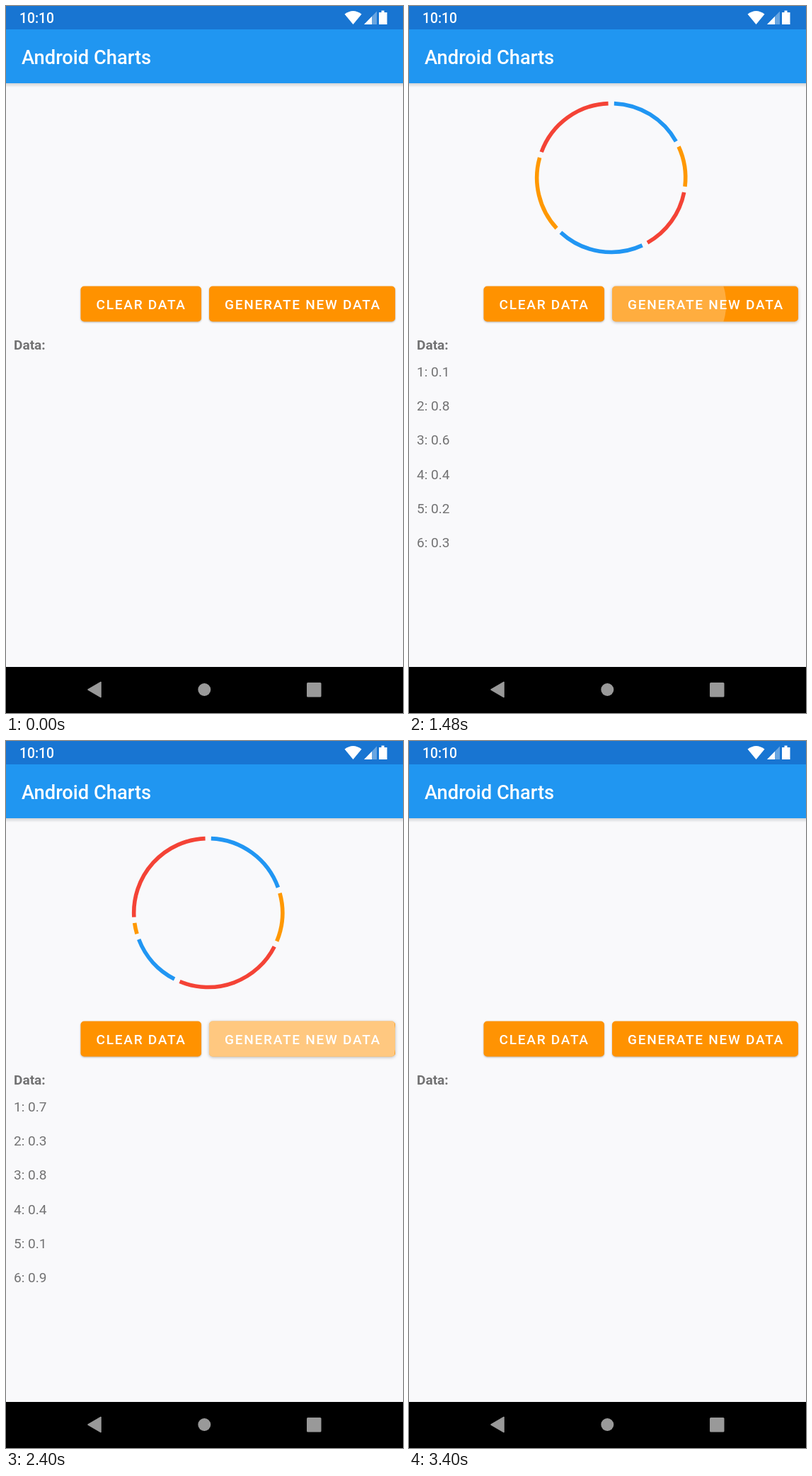
These frames come from a looping animation (561x998 px, 3.88 s). An HTML page:

```html
<!DOCTYPE html>
<html lang="en">
<head>
<meta charset="utf-8">
<title>Android Charts</title>
<style>
html, body { margin: 0; width: 100%; height: 100%; overflow: hidden; background: #f9f9fb; }
svg { display: block; width: 561px; height: 998px; font-family: Roboto, "Noto Sans", sans-serif; }
.medium { font-weight: 500; fill: #fff; }
.label { font-size: 19.1px; font-weight: 500; fill: #fff; letter-spacing: 1.71px; }
.data { font-size: 19.1px; fill: #727273; }
.face { fill: #ff9200; }
</style>
</head>
<body>
<svg viewBox="0 0 561 998">
  <defs>
    <linearGradient id="fade" x2="0" y2="1">
      <stop stop-opacity=".15"/>
      <stop offset="1" stop-opacity="0"/>
    </linearGradient>
    <clipPath id="clipClear"><rect x="105.5" y="395.5" width="170.5" height="50" rx="5"/></clipPath>
    <clipPath id="clipNew"><rect x="287" y="395.5" width="263" height="50" rx="5"/></clipPath>
  </defs>
  <rect width="561" height="998" fill="#f9f9fb"/>

  <rect y="109" width="561" height="6" fill="url(#fade)"/>
  <rect y="32" width="561" height="77" fill="#2096f1"/>
  <rect width="561" height="33" fill="#1875d2"/>
  <text class="medium" x="19" y="24" font-size="19.3">10:10</text>
  <g fill="#fff">
    <path d="M478.5 11.5Q490.500 2.500 502.500 11.500L490.500 26Z"/>
    <path d="M506 26L524 7.500V26Z" opacity=".35"/>
    <path d="M506 26L517 14.700V26Z"/>
    <path d="M527 9h3.500V6.500h4V9H538.500V26H527Z"/>
  </g>
  <text class="medium" x="22" y="81.500" font-size="27.3">Android Charts</text>

  <g id="ring" fill="none" stroke-width="5.6"></g>

  <g id="clear">
    <rect class="face" x="105.5" y="395.5" width="170.5" height="50" rx="5"/>
    <circle clip-path="url(#clipClear)" fill="#fff"/>
    <text class="label" x="127.500" y="428">CLEAR DATA</text>
  </g>
  <g id="new">
    <rect class="face" x="287" y="395.5" width="263" height="50" rx="5"/>
    <circle clip-path="url(#clipNew)" fill="#fff"/>
    <text class="label" x="309" y="428">GENERATE NEW DATA</text>
  </g>

  <text class="data" x="11" y="485.300" font-weight="700">Data:</text>
  <g id="rows"></g>

  <rect y="933" width="561" height="65"/>
  <g fill="#999">
    <path d="M116 965L134 954.500V975.500Z" stroke="#999" stroke-width="1.5" stroke-linejoin="round"/>
    <circle cx="280.300" cy="965" r="9"/>
    <rect x="425" y="955" width="20.500" height="20.500" rx="1.500"/>
  </g>
</svg>
<script>
const LOOP = 3880, MORPH = 200, GAP = 2.25;
const CENTER = { x: 285.7, y: 242.5, r: 105 };
const COLORS = ['#2196f3', '#ff9800', '#f44336'];
const EMPTY = [0, 0, 0, 0, 0, 0];

// press: ripple start, click: data change
const events = [
  { press: 780, click: 807, button: 'new', values: [.7, .4, .6, .8, .7, .8] },
  { press: 1444, click: 1480, button: 'new', values: [.1, .8, .6, .4, .2, .3] },
  { press: 2210, click: 2242, button: 'new', values: [.7, .3, .8, .4, .1, .9] },
  { press: 3030, click: 3070, button: 'clear', values: EMPTY }
];
const buttons = {
  clear: { touch: 190.7, center: 190.7, width: 170.5 },
  new: { touch: 360, center: 418.5, width: 263 }
};

const svg = document.querySelector('svg');
const $ = id => document.getElementById(id);
const clamp = v => Math.max(0, Math.min(1, v));
const mix = (a, b, k) => a + (b - a) * k;
const smooth = k => (1 - Math.cos(Math.PI * clamp(k))) / 2;

// cubic-bezier(.4, 0, .2, 1)
function standardEase(x) {
  let lo = 0, hi = 1;
  for (let i = 0; i < 20; i++) {
    const s = (lo + hi) / 2;
    const bx = 1.2 * s * (1 - s) ** 2 + .6 * s * s * (1 - s) + s ** 3;
    if (bx < x) lo = s; else hi = s;
  }
  return 3 * lo * lo * (1 - lo) + lo ** 3;
}

function add(parent, tag, attrs) {
  const node = document.createElementNS(svg.namespaceURI, tag);
  for (const key in attrs) node.setAttribute(key, attrs[key]);
  return $(parent).appendChild(node);
}

const arcs = EMPTY.map((_, i) => add('ring', 'path', { stroke: COLORS[i % 3] }));
const rows = EMPTY.map((_, i) => add('rows', 'text', { class: 'data', x: 11, y: 522.7 + i * 48.3 }));

function angles(values) {
  const sum = values.reduce((a, b) => a + b, 0);
  return values.map(v => sum ? v / sum * 360 : 0);
}

function point(deg) {
  const a = deg * Math.PI / 180;
  return `${CENTER.x + CENTER.r * Math.sin(a)} ${CENTER.y - CENTER.r * Math.cos(a)}`;
}

function arc(from, to) {
  // short slices are drawn backwards across their gap
  const a = Math.min(from, to), b = Math.max(from, to);
  return `M${point(a)}A${CENTER.r} ${CENTER.r} 0 ${b - a > 180 ? 1 : 0} 1 ${point(b)}`;
}

function drawChart(t) {
  let index = -1;
  events.forEach((e, i) => { if (t > e.click) index = i; });
  const now = index < 0 ? EMPTY : events[index].values;
  const before = index < 1 ? EMPTY : events[index - 1].values;
  const k = index < 0 ? 1 : smooth((t - events[index].click) / MORPH);
  const from = angles(before), to = angles(now);
  const sweep = to.map((v, i) => mix(from[i], v, k));
  const visible = sweep.some(v => v > .01);
  let start = 0;
  sweep.forEach((size, i) => {
    arcs[i].setAttribute('d', visible ? arc(start + GAP, start + size - GAP) : '');
    start += size;
    rows[i].textContent = now === EMPTY ? '' : `${i + 1}: ${now[i].toFixed(1)}`;
  });
}

function drawButton(id, t) {
  const b = buttons[id], group = $(id), circle = group.querySelector('circle');
  const event = events.find(e => e.button === id && t >= e.press && t < e.press + 375);
  const age = event ? t - event.press : 0;
  const k = standardEase(clamp(age / 225));
  const fade = Math.min(clamp(age / 75), clamp((375 - age) / 150));
  circle.setAttribute('cx', mix(b.touch, b.center, k));
  circle.setAttribute('cy', 420.5);
  circle.setAttribute('r', mix(b.width * .3, Math.hypot(b.width, 50) / 2, k));
  circle.setAttribute('opacity', event ? fade * .5 : 0);
  const lift = Math.min(clamp(age / 60), clamp((260 - age) / 100));
  group.querySelector('.face').style.filter =
    `drop-shadow(0 ${1.3 + lift}px ${1.3 + lift}px rgba(0,0,0,.27))`;
}

function frame() {
  const t = performance.now() % LOOP;
  drawChart(t);
  drawButton('clear', t);
  drawButton('new', t);
  requestAnimationFrame(frame);
}
frame();
</script>
</body>
</html>
```
